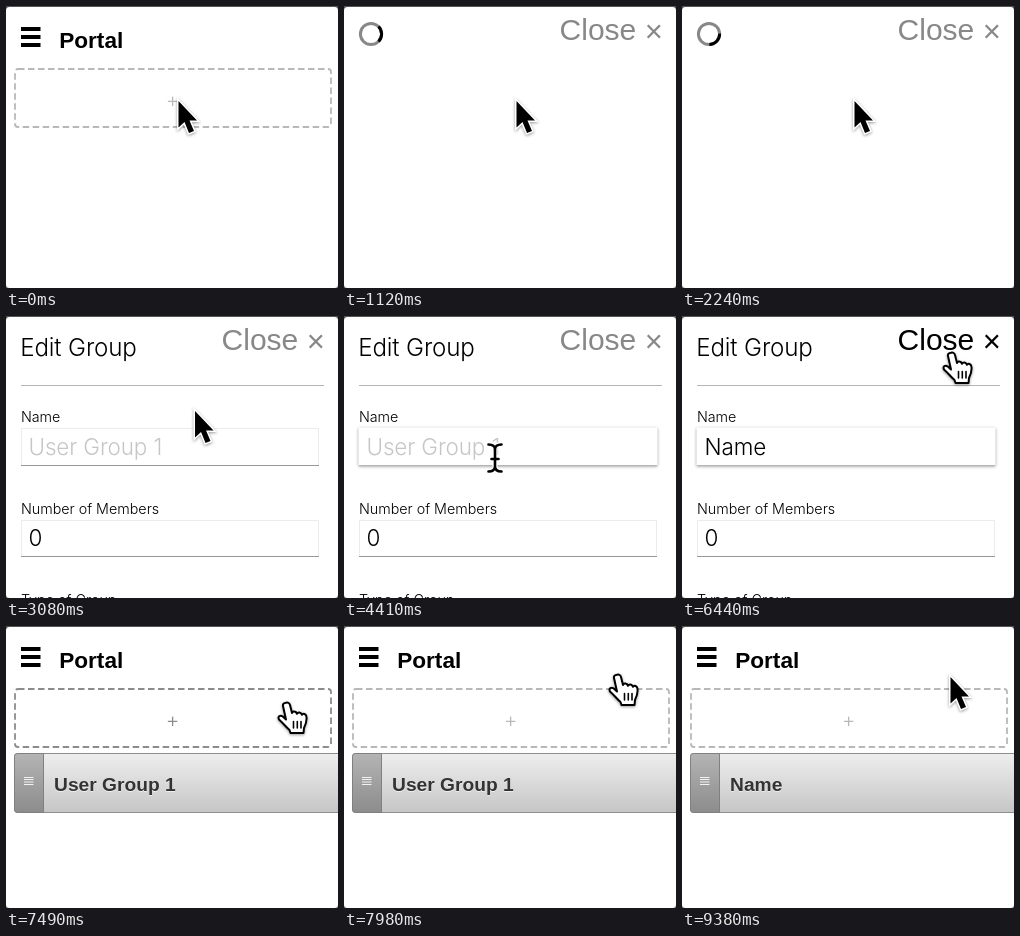
Write an HTML page that moves like this. It is 332x282 px and loops after 9.45 s.

```html
<!DOCTYPE html>
<html lang="en">
<head>
<meta charset="utf-8">
<title>Portal</title>
<style>
  html, body { margin: 0; width: 100%; height: 100%; overflow: hidden; background: #fff; }
  svg { display: block; width: 100vw; height: 100vh; }
  text { white-space: pre; }
  .bold { font: bold 22.6px "Liberation Sans", Arial, sans-serif; }
  .row { font-size: 19.2px; fill: #333; filter: drop-shadow(0 1px 0 rgba(255, 255, 255, .6)); }
  .close { font: 30px "Liberation Sans", Arial, sans-serif; }
  .light { font: 300 22.5px Inter, Roboto, sans-serif; letter-spacing: -.15px; }
  .title { font-size: 24.2px; }
  .label { font-size: 14.3px; letter-spacing: 0; }
  .focus { fill: #fff; filter: drop-shadow(0 1px 1.5px rgba(0, 0, 0, .4)); }
  .pointer { filter: drop-shadow(0 1.5px 1.5px rgba(0, 0, 0, .4)); }
</style>
</head>
<body>
<svg viewBox="0 0 332 282" preserveAspectRatio="none">
  <defs>
    <linearGradient id="bar" x2="0" y2="1">
      <stop stop-color="#eee"/><stop offset="1" stop-color="#c6c6c6"/>
    </linearGradient>
    <linearGradient id="grip" x2="0" y2="1">
      <stop stop-color="#b4b4b4"/><stop offset="1" stop-color="#8c8c8c"/>
    </linearGradient>
    <path id="beam" d="M2.5 2.5Q9 2.5 9 7.5Q9 2.5 15.5 2.5M9 7V25M2.5 29.5Q9 29.5 9 24.5Q9 29.5 15.5 29.5M5.5 17H12.5"/>
  </defs>
  <rect width="332" height="282" fill="#555"/>
  <rect y="1" width="332" height="281" rx="3.5" fill="#fff"/>

  <g id="portal">
    <path d="M15 23H34.5M15 31H34.5M15 39H34.5" stroke="#000" stroke-width="4"/>
    <text class="bold" x="53.2" y="42.2">Portal</text>
    <rect id="slot" x="9" y="63" width="316" height="58" rx="3" fill="none" stroke-width="1.8" stroke-dasharray="6.5 3.5"/>
    <text id="plus" class="light" x="166.5" y="101.2" text-anchor="middle" style="font-size:21px">+</text>
    <g id="row">
      <rect x="8.5" y="127.5" width="340" height="59" rx="3" fill="url(#bar)" stroke="#8d8d8d"/>
      <path d="M37.5 127.5H11.5Q8.5 127.5 8.5 130.5V183.5Q8.5 186.5 11.5 186.5H37.5Z" fill="url(#grip)" stroke="#808080"/>
      <path d="M18 151.5H27.5M18 153.5H27.5M18 156H27.5M18 158.5H27.5" stroke="#f2f2f2"/>
      <text id="rowName" class="bold row" x="48.1" y="165"></text>
    </g>
  </g>

  <g id="spinner" fill="none" stroke-width="3">
    <circle cx="27" cy="28" r="10.6" stroke="#888"/>
    <path id="arc" d="M34.5 20.5A10.6 10.6 0 0 1 34.5 35.5" stroke="#000"/>
  </g>

  <g id="form">
    <text class="light title" x="14.2" y="40">Edit Group</text>
    <path d="M15 69.5H318" stroke="#b5b5b5"/>
    <text class="light label" x="14.9" y="106">Name</text>
    <text class="light label" x="14.9" y="198">Number of Members</text>
    <text class="light label" x="14.9" y="289">Type of Group</text>
    <g fill="#fff" stroke="#ececec">
      <rect x="15.5" y="112.5" width="297" height="37"/>
      <rect x="15.5" y="204.5" width="297" height="36"/>
      <path d="M15 149.5H313M15 240.5H313" stroke="#999"/>
    </g>
    <rect id="focus" class="focus" x="14.5" y="111.5" width="299" height="38"/>
    <text id="hint" class="light" x="22.5" y="138.5" fill="#c6c6c6">User Group 1</text>
    <text id="typed" class="light" x="22.5" y="138.5"></text>
    <rect id="caret" y="118" width="1.3" height="25"/>
    <text class="light" x="22.6" y="230">0</text>
  </g>
  <text id="close" class="close" x="215.6" y="34">Close <tspan dy="2" font-size="31">×</tspan></text>

  <circle id="ring" fill="none" stroke="#000" stroke-opacity=".22" stroke-width="2"/>
  <path id="arrow" class="pointer" d="M0 0V26.5L6 21L10.5 32L15.5 30L11 19.5H18.5Z" stroke="#fff" stroke-width="3" paint-order="stroke"/>
  <g id="ibeam" fill="none" stroke-linecap="round">
    <use href="#beam" stroke="#fff" stroke-width="5"/>
    <use href="#beam" stroke="#000" stroke-width="2.6"/>
  </g>
  <g id="hand" class="pointer" stroke="#000" stroke-width="2" stroke-linejoin="round" stroke-linecap="round">
    <path fill="#fff" d="M9 1.8C11 1.2 12.5 2.2 13 4L15 12C15.5 10 19 10 20 12.8C21 10.8 24 11 25 13.8C26 12 29.3 12.8 29.5 16C30 20 29 23 27 27L26.5 32H13.5L12.5 29C9 26 6 22 2.2 18.7C.3 15.5 3 13.8 5.5 15.3L9 18.5L6 5C5.5 3 7 2 9 1.8Z"/>
    <path d="M16.5 20.5V27M20.3 20.5V27M24 20.5V27" stroke-width="1.6"/>
  </g>
</svg>
<script>
const LOOP = 9450, STEP = 70;
const CLICKED = 840, LOADED = 2520, FOCUSED = 3920, TYPING = 4690, REAPPEAR = 5950, CLOSED = 6930;

// Pointer stops: time, x, y
const STOPS = [
  [0, 172, 95], [2870, 172, 95], [3360, 214, 95], [3780, 145.5, 131.5],
  [5880, 145.5, 131.5], [6440, 264, 39], [6790, 285, 28],
  [7140, 285, 28], [7490, 275, 79], [7980, 268, 51], [LOOP, 268, 51]
];
// Click ripples: start, end, x, y, largest radius
const RIPPLES = [
  [630, 840, 172, 95, 62], [3780, 4060, 145.5, 131.5, 36], [6790, CLOSED, 285, 28, 36]
];
const KEYS = [TYPING, 5320, 5460, 5600];
const CARET_ON = [[FOCUSED, 4410], [TYPING, 5250], [5320, 6130]];

const ui = Object.fromEntries([...document.querySelectorAll("[id]")].map(e => [e.id, e]));
const show = (el, on) => { el.style.display = on ? "" : "none"; };
const within = (t, a, b) => t >= a && t < b;
const place = (el, x, y) => el.setAttribute("transform", `translate(${x} ${y})`);

function pointerAt(t) {
  const i = STOPS.findIndex(s => s[0] > t);
  const [t0, x0, y0] = STOPS[i - 1], [t1, x1, y1] = STOPS[i];
  const u = (t - t0) / (t1 - t0), e = u * u * (3 - 2 * u);
  return [x0 + (x1 - x0) * e, y0 + (y1 - y0) * e];
}

function pointerKind(t, x, y) {
  if (within(t, TYPING, REAPPEAR)) return "none";
  if (t >= CLOSED) return t < 9380 ? "hand" : "arrow";
  if (t < LOADED) return "arrow";
  if (y > 112) return "ibeam";
  return x > 216 && y < 42 ? "hand" : "arrow";
}

function drawForm(t) {
  const text = "Name".slice(0, KEYS.filter(k => t >= k).length);
  ui.typed.textContent = text;
  show(ui.hint, !text);
  show(ui.focus, within(t, FOCUSED, 6790));
  show(ui.caret, CARET_ON.some(([a, b]) => within(t, a, b)));
  ui.caret.setAttribute("x", 22.8 + (text ? ui.typed.getComputedTextLength() : 0));
}

function drawPointer(t, x, y, kind) {
  for (const name of ["arrow", "ibeam", "hand"]) show(ui[name], name === kind);
  place(ui.arrow, x + .5, y);
  place(ui.ibeam, x - 3.5, y - 5.5);
  place(ui.hand, x - 4, y - 4);

  const ripple = RIPPLES.find(([a, b]) => within(t, a, b));
  show(ui.ring, ripple);
  if (!ripple) return;
  const [start, , cx, cy, most] = ripple;
  ui.ring.setAttribute("r", Math.min(most, 12 + (t - start) / STEP * 25));
  ui.ring.setAttribute("cx", cx);
  ui.ring.setAttribute("cy", cy);
}

function draw(t) {
  const [x, y] = pointerAt(t), kind = pointerKind(t, x, y);
  const onPortal = t < CLICKED || t >= CLOSED;
  const onForm = within(t, LOADED, CLOSED);

  show(ui.portal, onPortal);
  show(ui.row, t >= CLOSED);
  show(ui.spinner, within(t, CLICKED, LOADED));
  show(ui.form, onForm);
  show(ui.close, !onPortal);

  const slotColor = t >= CLOSED && y > 62 ? "#8c8c8c" : "#b8b8b8";
  ui.slot.setAttribute("stroke", slotColor);
  ui.plus.setAttribute("fill", slotColor);
  ui.rowName.textContent = t < 8330 ? "User Group 1" : "Name";
  ui.arc.setAttribute("transform", `rotate(${(t - 1120) * .36} 27 28)`);
  ui.close.setAttribute("fill", onForm && kind === "hand" ? "#000" : "#888");
  if (onForm) drawForm(t);
  drawPointer(t, x, y, kind);
}

const begin = performance.now();
function tick() {
  const t = (performance.now() - begin) % LOOP;
  draw(Math.floor(t / STEP) * STEP);
  requestAnimationFrame(tick);
}
tick();
</script>
</body>
</html>
```
